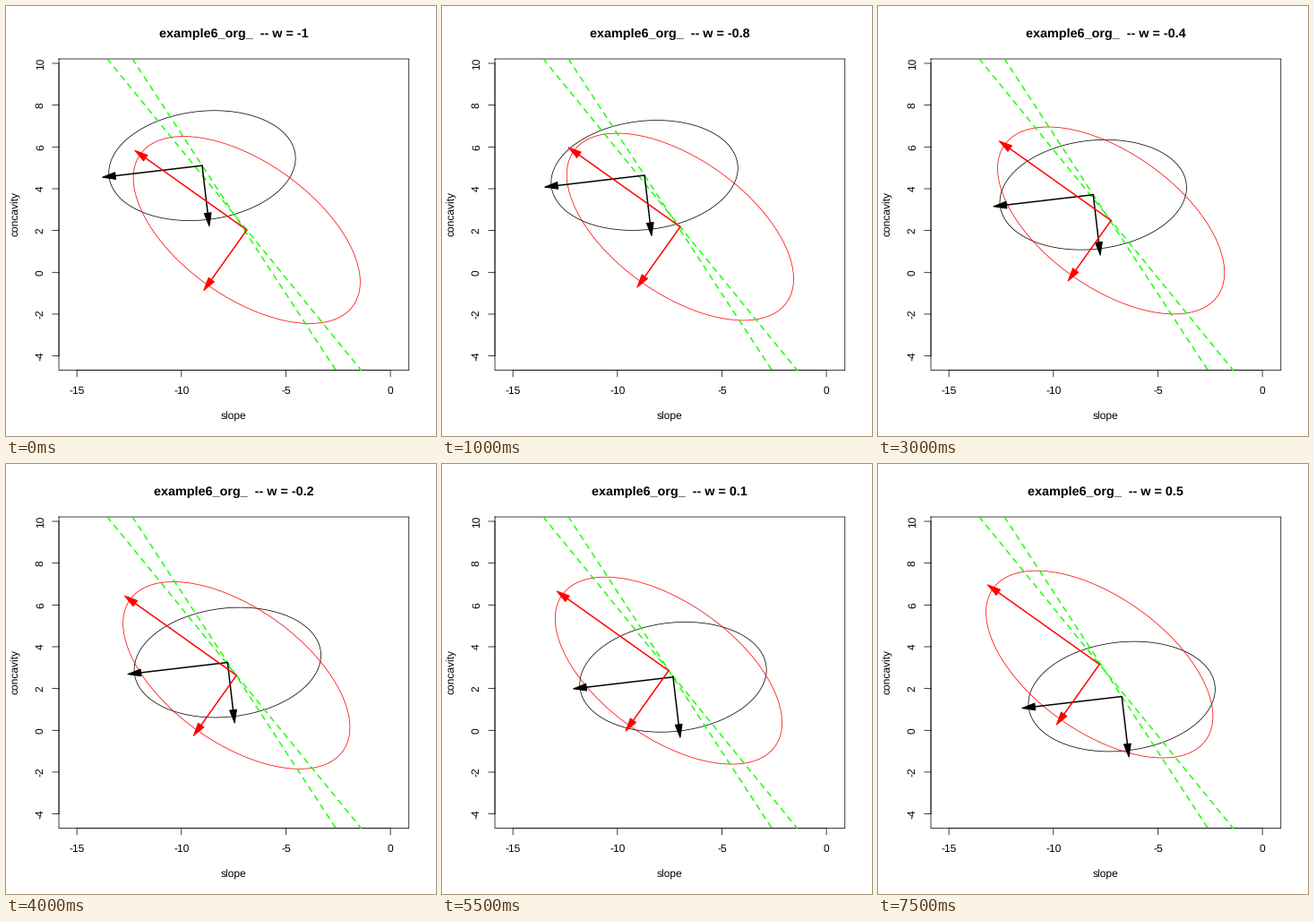
A matplotlib script for the animation above (8000 ms loop, 480 by 480 pixels).

```python
import numpy as np
import matplotlib.pyplot as plt
from matplotlib.animation import FuncAnimation
from matplotlib.patches import Polygon, Rectangle

plt.rcParams["font.family"] = "Liberation Sans"
plt.rcParams["text.hinting"] = "none"

SIZE, DPI = 480, 72
FRAMES, STEP_MS = 16, 500
LEFT, TOP, RIGHT, BOTTOM = 59.04, 59.04, 449.76, 406.56
UNIT = 23.33                        # pixels per data unit on both axes
X0, Y0 = 429.1, 297.3               # pixel position of data (0, 0)
MID = np.array([254.4, 232.4])      # shared centre at w = 0
GREEN = "#1aff00"

# colour, drift per unit of w, semi-axes, tilt of the long axis (degrees)
SHAPES = [
    ("black", np.array([35.45, 54.25]), (104.7, 60.6), -6.7),
    ("red", np.array([-14.35, -17.6]), (145.8, 75.4), 35.4),
]
HEAD = np.array([[7.4, 0], [-7.2, 3.9], [-7.2, -3.9]])

fig = plt.figure(figsize=(SIZE / DPI, SIZE / DPI), dpi=DPI, facecolor="white")
ax = fig.add_axes([0, 0, 1, 1])
ax.set_xlim(0, SIZE)
ax.set_ylim(SIZE, 0)
ax.axis("off")


def stroke(xs, ys):
    ax.plot(xs, ys, color="black", lw=0.75, snap=False, zorder=1)


def label(x, y, text, angle=0, **style):
    return ax.text(x, y, text, ha="center", va="baseline", rotation=angle,
                   rotation_mode="anchor", **{"fontsize": 12, **style})


def draw_axes():
    stroke([LEFT, RIGHT, RIGHT, LEFT, LEFT], [TOP, TOP, BOTTOM, BOTTOM, TOP])
    xs = {v: X0 + v * UNIT for v in range(-15, 1, 5)}
    ys = {v: Y0 - v * UNIT for v in range(-4, 11, 2)}
    stroke([xs[-15], xs[0]], [BOTTOM, BOTTOM])
    stroke([LEFT, LEFT], [ys[-4], ys[10]])
    for v, x in xs.items():
        stroke([x, x], [BOTTOM, BOTTOM + 7.2])
        label(x, 432.6, str(v))
    for v, y in ys.items():
        stroke([LEFT - 7.2, LEFT], [y, y])
        label(41.8, y, str(v), 90)
    label(254.4, 461.4, "slope")
    label(13.6, 232, "concavity", 90)


class Spread:
    """Ellipse with an arrow along each semi-axis."""

    def __init__(self, color, drift, radii, tilt, z):
        self.drift = drift
        a = np.radians(tilt)
        u = np.array([-np.cos(a), -np.sin(a)])
        v = np.array([-np.sin(a), np.cos(a)])
        t = np.linspace(0, 2 * np.pi, 200)[:, None]
        rim, = ax.plot([], [], color=color, lw=0.75, zorder=z)
        self.parts = [(rim, radii[0] * np.cos(t) * u + radii[1] * np.sin(t) * v)]
        for d, r in zip((u, v), radii):
            shaft, = ax.plot([], [], color=color, lw=1.5, zorder=z + 4,
                             solid_capstyle="round")
            self.parts.append((shaft, np.array([[0, 0], r * d])))
            side = np.array([-d[1], d[0]])
            head = Polygon(HEAD, fc=color, ec=color, lw=1, joinstyle="round",
                           zorder=z + 4)
            ax.add_patch(head)
            self.parts.append((head, r * d + HEAD @ np.array([d, side])))

    def move(self, w):
        centre = MID + w * self.drift
        for art, pts in self.parts:
            pts = pts + centre
            if isinstance(art, Polygon):
                art.set_xy(pts)
            else:
                art.set_data(pts[:, 0], pts[:, 1])


def draw_paths():
    """Dashed lines along which the two centres travel."""
    box = Rectangle((LEFT, TOP), RIGHT - LEFT, BOTTOM - TOP, transform=ax.transData)
    ys = np.array([TOP, BOTTOM])
    for _, drift, *_ in SHAPES:
        xs = MID[0] + (ys - MID[1]) * drift[0] / drift[1]
        line, = ax.plot(xs, ys, color=GREEN, lw=1.5, ls=(0, (4, 4)),
                        dash_capstyle="round", zorder=4)
        line.set_clip_path(box)


draw_axes()
draw_paths()
spreads = [Spread(*s, z=2 + i) for i, s in enumerate(SHAPES)]
title = label(254.4, 34.8, "", fontsize=14.4, fontweight="bold")


def update(i):
    w = (i - 10) / 10
    title.set_text(f"example6_org_  -- w = {w:g}")
    for s in spreads:
        s.move(w)
    return []


anim = FuncAnimation(fig, update, frames=FRAMES, interval=STEP_MS,
                     repeat=True, repeat_delay=0, blit=False)
plt.show()
```
